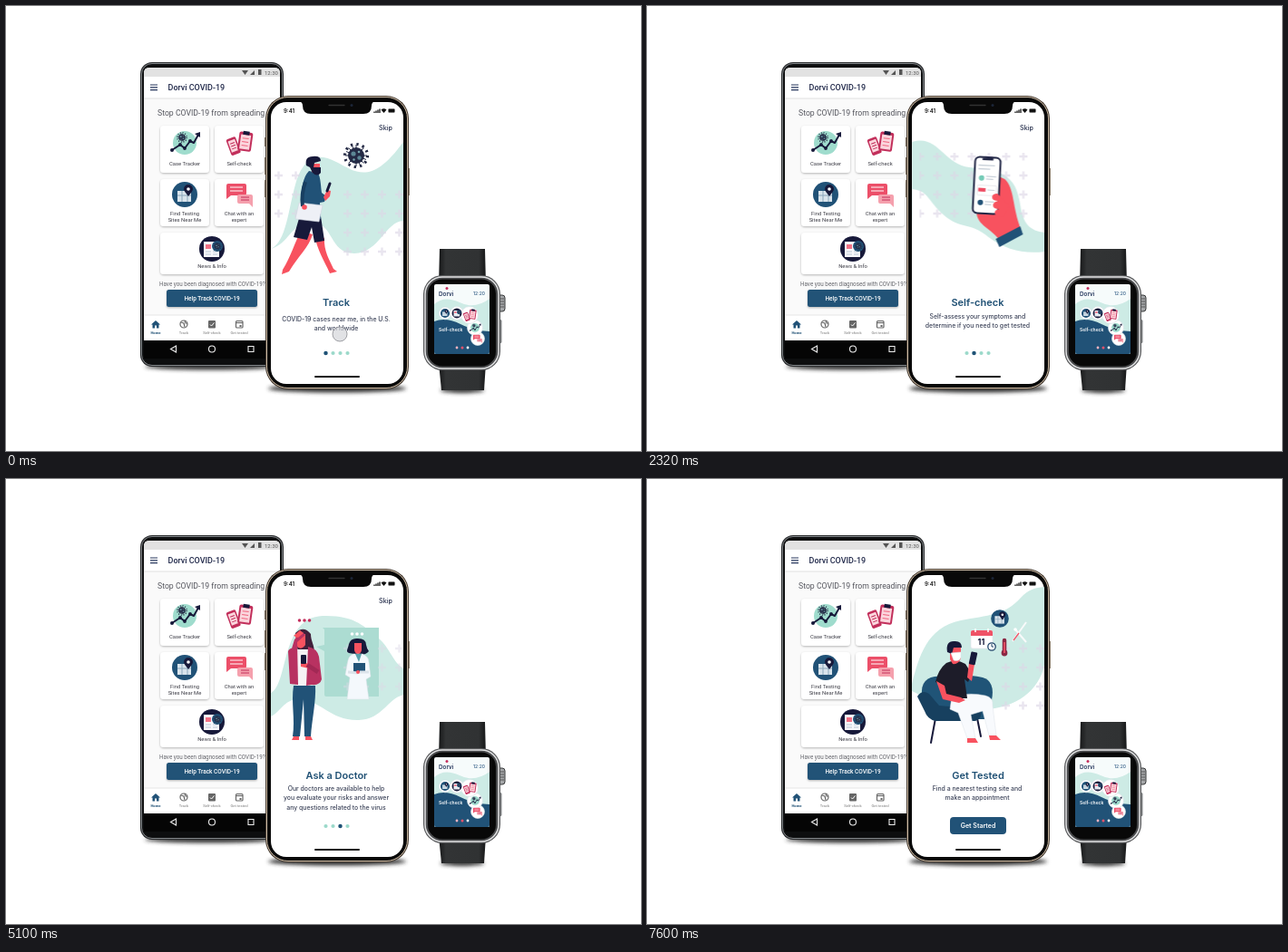
An HTML page for the animation above (8 s loop, 700 by 491 pixels).

```html
<!DOCTYPE html>
<html lang="en">
<head>
<meta charset="utf-8">
<title>Health app on three devices</title>
<style>
html, body { margin: 0; width: 100%; height: 100%; overflow: hidden; background: #fff; }
svg { display: block; width: 100%; height: 100%; }
text { font-family: Roboto, sans-serif; }
.ios text { font-family: Inter, sans-serif; }
.mid { text-anchor: middle; }
.title { font-size: 11px; font-weight: 600; fill: #1f5074; text-anchor: middle; }
.sub { font-size: 6.9px; font-weight: 500; fill: #3b4258; text-anchor: middle; }
.card { fill: #fff; filter: url(#cardShadow); }
.label { font-size: 5.9px; fill: #3b3b44; text-anchor: middle; }
.tab { font-size: 4.2px; fill: #777; text-anchor: middle; }
.skin { fill: #f8525f; }
.navy { fill: #17193a; }
.blue { fill: #215277; }
.wave { fill: #cdebe5; }
.shadow { fill: #333; filter: url(#blur); }
.line { fill: none; stroke: #17193a; stroke-linecap: round; stroke-linejoin: round; }

#strip, #trend, #cursor, #tapHand, .outer, .inner, #pager, .pip { animation: 8s linear infinite; }
#strip { animation-name: strip; }
@keyframes strip {
  0%, 22.75% { transform: none; animation-timing-function: cubic-bezier(.4,0,.2,1); }
  29.5%, 53.75% { transform: translateX(-146px); animation-timing-function: cubic-bezier(.4,0,.2,1); }
  60.5%, 88.25% { transform: translateX(-292px); animation-timing-function: cubic-bezier(.4,0,.2,1); }
  95%, 100% { transform: translateX(-438px); }
}
#trend { stroke-dasharray: 1 1; animation-name: trend; }
@keyframes trend { 0%, 1.25% { stroke-dashoffset: 1; } 8%, 100% { stroke-dashoffset: 0; } }
#endDot { animation: blink .4s .66s ease-in-out 6 alternate; }
@keyframes blink { to { opacity: .25; } }
#cursor { animation-name: cursor; }
@keyframes cursor {
  0%, 12% { transform: translate(368px,362px); opacity: 1; animation-timing-function: ease-in-out; }
  15.5% { transform: translate(354px,376px); opacity: 1; animation-timing-function: ease-in-out; }
  21%, 22.75% { transform: translate(401px,373px); opacity: 1; animation-timing-function: ease-in-out; }
  27% { transform: translate(330px,371px); opacity: .8; }
  29%, 42.5% { transform: translate(322px,371px); opacity: 0; animation-timing-function: step-end; }
  44% { transform: translate(428px,385px); opacity: 1; animation-timing-function: ease-in-out; }
  51.5%, 53.75% { transform: translate(401px,376px); opacity: 1; animation-timing-function: ease-in-out; }
  58% { transform: translate(330px,373px); opacity: .8; }
  60%, 79% { transform: translate(322px,373px); opacity: 0; animation-timing-function: step-end; }
  80.5% { transform: translate(418px,393px); opacity: 1; animation-timing-function: ease-in-out; }
  85.5%, 88.25% { transform: translate(393px,378px); opacity: 1; animation-timing-function: ease-in-out; }
  92% { transform: translate(330px,376px); opacity: .8; }
  94%, 100% { transform: translate(322px,376px); opacity: 0; }
}
#tapHand { animation-name: reach; }
@keyframes reach {
  0%, 31.5% { transform: translate(-55px,55px); opacity: 0; animation-timing-function: ease-out; }
  33% { opacity: 1; }
  42%, 100% { transform: none; opacity: 1; }
}
.outer { animation-name: hopOuter; }
@keyframes hopOuter { 0%, 61% { transform: none; } 63.75% { transform: translateY(-3px); } 66.5%, 69% { transform: none; } 71.5% { transform: translateY(-3px); } 74%, 100% { transform: none; } }
.inner { animation-name: hopInner; }
@keyframes hopInner { 0%, 64% { transform: none; } 67% { transform: translateY(-3px); } 70%, 72.5% { transform: none; } 74.3% { transform: translateY(-3px); } 76%, 100% { transform: none; } }
#pager { animation-name: pager; }
@keyframes pager { 0%, 89% { opacity: 1; } 91.5%, 100% { opacity: 0; } }
.pip { fill: #215277; animation-name: pip; animation-timing-function: step-end; }
@keyframes pip { 0% { transform: none; } 26% { transform: translateX(8px); } 57% { transform: translateX(16px); } 91% { transform: translateX(24px); } }
</style>
</head>
<body>
<svg viewBox="0 0 700 491" xmlns="http://www.w3.org/2000/svg">
<defs>
  <filter id="cardShadow" x="-20%" y="-20%" width="140%" height="140%"><feDropShadow dx="0" dy="1" stdDeviation="1.3" flood-opacity=".28"/></filter>
  <filter id="blur" x="-20%" y="-200%" width="140%" height="500%"><feGaussianBlur stdDeviation="2"/></filter>
  <linearGradient id="strap"><stop offset="0" stop-color="#161718"/><stop offset=".15" stop-color="#323435"/><stop offset=".85" stop-color="#303233"/><stop offset="1" stop-color="#161718"/></linearGradient>
  <pattern id="plus" width="19" height="21" patternUnits="userSpaceOnUse" x="291" y="176"><path d="M5 11h9M9.500 6.500v9" stroke="#ddd7e6" stroke-width="2.400"/></pattern>
  <clipPath id="screen"><rect x="292" y="106" width="146" height="311" rx="17"/></clipPath>
  <clipPath id="watchScreen"><rect x="472" y="307" width="61" height="77" rx="2"/></clipPath>
  <mask id="reveal" maskUnits="userSpaceOnUse" x="340" y="150" width="100" height="80"><path id="trend" pathLength="1" d="M345 222L367 209L382 193L397 199L430 159" fill="none" stroke="#fff" stroke-width="14"/></mask>
  <g id="virus">
    <circle r="12.500" fill="none" stroke="#242a45" stroke-width="3.200" stroke-dasharray="2.300 4.245"/>
    <path d="M-12 0H12M0-12V12M-8.500-8.500l17 17M-8.500 8.500l17-17M-11-4.500L11 4.500M-4.500-11L4.500 11" stroke="#242a45" stroke-width="1"/>
    <circle r="9" fill="#242a45"/><circle cx="-3" cy="-2" r="2.600" fill="#5c8795"/><circle cx="3.500" cy="2.500" r="2.200" fill="#5c8795"/><circle cx="3" cy="-4" r="1.300" fill="#78a8ae"/><circle cx="-2.500" cy="4.500" r="1.200" fill="#78a8ae"/>
  </g>
  <g id="site">
    <circle r="14" class="blue"/><path d="M-8-4h15v12h-15z" fill="#d9e4ec"/><path d="M-8 1h15M-3-4v12M3-4v12" stroke="#8aa6ba"/>
    <path d="M4 2C1-2-1-4-1-6a5 5 0 0 1 10 0c0 2-2 4-5 8z" class="navy"/><circle cx="4" cy="-6" r="1.800" fill="#fff"/>
  </g>
  <g id="tracker">
    <circle r="13" fill="#9fdccd"/><use href="#virus" transform="translate(-3 -6) scale(.42)"/>
    <path d="M-14 8l9-6l5 4l6-8l4 2l5-9" class="line" stroke-width="2"/><path d="M11-10l6-2l0 6z" class="navy"/>
    <g class="navy"><circle cx="-14" cy="8" r="2"/><circle cx="-5" cy="2" r="1.900"/><circle cx="0" cy="6" r="1.900"/><circle cx="6" cy="-2" r="1.900"/></g>
  </g>
  <g id="check">
    <g transform="rotate(-20 -6 3)"><rect x="-12" y="-6" width="11" height="19" rx="2" fill="#c22f5b"/><rect x="-10.500" y="-3.500" width="8" height="13" fill="#fbd6dd"/><path d="M-9 0h5M-9 3h5M-9 6h5" stroke="#c22f5b"/></g>
    <g transform="rotate(8 6 0)"><rect x="-1" y="-12" width="15" height="21" rx="2" fill="#c22f5b"/><rect x="1" y="-9" width="11" height="16" fill="#fbd6dd"/><path d="M3-5h7M3-1h7M3 3h7" stroke="#ef637d"/><path d="M3-13h7v4h-7z" class="navy"/></g>
  </g>
  <g id="chat">
    <path d="M-13-12h20q2 0 2 2v9q0 2-2 2h-15l-5 4v-15q0-2 2-2z" fill="#ec4f69"/><path d="M-9-8h14M-9-4h14" stroke="#fff" stroke-width="1.200"/>
    <path d="M1 0h13q2 0 2 2v12l-4-4h-11q-2 0-2-2v-6q0-2 2-2z" fill="#f5a0ad"/><path d="M3 3h9M3 6h9" stroke="#c22f5b"/>
  </g>
  <g id="news">
    <circle r="14" class="navy"/><path d="M-9-8h17v17h-17z" fill="#f6f7fb"/><path d="M-7-5h6v5h-6z" fill="#f17286"/><path d="M-7 3h6M-7 6h6M1 3h5M1 6h5" stroke="#b7c6d3" stroke-width="1.200"/><circle cx="6" cy="-3" r="6" class="blue"/><use href="#virus" transform="translate(6 -3) scale(.33)"/>
  </g>
  <g id="talk"><circle class="outer" cx="-5.500" r="1.800"/><circle class="inner" r="1.800"/><circle class="outer" cx="5.500" r="1.800"/></g>
</defs>

<!-- Android phone -->
<g>
  <ellipse class="shadow" cx="225" cy="398" rx="72" ry="3.500"/>
  <rect x="148" y="62" width="158" height="336" rx="13" fill="#2a2c2e"/>
  <rect x="149.500" y="63.500" width="155" height="333" rx="11.500" fill="#0d0e0f" stroke="#a0a4a8" stroke-width=".8"/>
  <path d="M152 74q0-6 6-6h138q6 0 6 6v295h-150z" fill="#fafafa"/>
  <path d="M152 78v-4q0-6 6-6h138q6 0 6 6v4z" fill="#e2e2e2"/>
  <path d="M260 71h7l-3.500 5zM269 76l5-5v5z" fill="#555"/><rect x="278" y="70" width="3.500" height="6" fill="#555"/>
  <text x="285" y="75.500" font-size="6" fill="#555">12:30</text>
  <path d="M152 78h150v23.500h-150z" fill="#fff"/><path d="M152 102h150" stroke="#e2e2e2"/>
  <path d="M159 87h8M159 89.800h8M159 92.600h8" stroke="#26365c" stroke-width="1.200"/>
  <text x="178.500" y="93" font-size="9" font-weight="500" fill="#222a4b">Dorvi COVID-19</text>
  <text x="167" y="121" font-size="8.700" fill="#55565e">Stop COVID-19 from spreading</text>
  <rect class="card" x="170" y="132" width="54" height="52" rx="4"/><use href="#tracker" x="197" y="151"/><text class="label" x="197" y="176">Case Tracker</text>
  <rect class="card" x="230" y="132" width="54" height="52" rx="4"/><use href="#check" x="257" y="151"/><text class="label" x="257" y="176">Self-check</text>
  <rect class="card" x="170" y="191" width="54" height="52" rx="4"/><use href="#site" x="197" y="208"/><text class="label" x="197" y="231">Find Testing</text><text class="label" x="197" y="238">Sites Near Me</text>
  <rect class="card" x="230" y="191" width="54" height="52" rx="4"/><use href="#chat" x="256" y="208"/><text class="label" x="257" y="231">Chat with an</text><text class="label" x="257" y="238">expert</text>
  <rect class="card" x="170" y="250" width="114" height="46" rx="4"/><use href="#news" x="227" y="268"/><text class="label" x="227" y="289">News &amp; Info</text>
  <text x="169" y="309" font-size="6.300" fill="#66676d">Have you been diagnosed with COVID-19?</text>
  <rect x="177" y="313" width="100" height="19" rx="2.500" class="blue" filter="url(#cardShadow)"/>
  <text class="mid" x="227" y="325" font-size="6.500" font-weight="500" fill="#fff">Help Track COVID-19</text>
  <path d="M152 341h150v28h-150z" fill="#fff"/><path d="M152 341h150" stroke="#e5e5e5"/>
  <path d="M160 351.500l5-4.500l5 4.500h-1.500v4h-2.500v-3h-2v3h-2.500v-4z" class="blue"/>
  <g fill="none" stroke="#666" stroke-width="1.200"><circle cx="196" cy="351" r="4"/><path d="M193 349l3 1l1 4M197 347l1 3h2"/><rect x="253.500" y="347.500" width="7.500" height="7.500" rx="1"/><path d="M253 349.500h8"/></g>
  <rect x="223" y="347" width="8" height="8.500" rx="1" fill="#666"/><path d="M225 351.500l1.500 1.500l3-3.500" fill="none" stroke="#fff"/><path d="M257.500 352h2v2h-2z" fill="#666"/>
  <text class="tab" x="165" y="361.500" style="fill:#1f5074;font-weight:700">Home</text><text class="tab" x="196" y="361.500">Track</text><text class="tab" x="227" y="361.500">Self-check</text><text class="tab" x="257" y="361.500">Get tested</text>
  <path d="M152 369h150v20h-150z" fill="#050505"/>
  <g fill="none" stroke="#eee" stroke-width="1.100"><path d="M187.500 375v7l-6-3.500z"/><circle cx="227" cy="378.500" r="3.500"/><path d="M267 375.500h6v6h-6z"/></g>
</g>

<!-- Main phone -->
<g class="ios">
  <ellipse class="shadow" cx="365" cy="422" rx="76" ry="4.500"/>
  <path d="M285.700 145v10M285.700 167v19M285.700 192v19M444.300 179v30" stroke="#73634f"/>
  <rect x="286" y="99" width="158" height="324" rx="25" fill="#4a3f35"/>
  <rect x="287.500" y="100.500" width="155" height="321" rx="23.500" fill="#090909" stroke="#cdbca6"/>
  <rect x="292" y="106" width="146" height="311" rx="17" fill="#fff"/>
  <g clip-path="url(#screen)">
    <g id="strip">
      <g>
        <path class="wave" d="M292 268C309 260 311 225 319 197S341 160 364 172S403 198 438 150V237C418 238 412 272 384 273C354 273 363 236 333 239C314 241 312 262 292 268z"/>
        <path d="M292 176h55v65h-55zM367 197h71v84h-71z" fill="url(#plus)" opacity=".65"/>
        <use href="#virus" x="386" y="165"/>
        <path class="skin" d="M325 248L338 252C334 266 322 276 312 293L304 296L305 291C314 276 318 262 325 248zM340 252L351 256C350 270 357 281 361 290L365 293L357 295C351 281 343 270 340 252z"/>
        <path class="navy" d="M324 231L347 232L351 259L340 261L337 244L332 258L317 255z"/>
        <path class="blue" d="M334 182L344 184C347 190 347 199 348 206L353 210L351 216L346 217L347 235L324 234C326 219 324 211 327 197Q329 187 334 182z"/>
        <path class="skin" d="M337 174h9v8q-1 4-5 3l-4-2zM350 211l4-8l4 1l-1 6l-5 5z"/>
        <path class="navy" d="M331 176Q329 166 338 166Q347 165 347 171L340 173L339 178H347V184Q343 189 338 184L335 178z"/>
        <path class="line" d="M357 196l-3 8" stroke-width="3"/>
        <path d="M323 217L349 220L345 238L319 235z" fill="#eef0f6" stroke="#cfd5df" stroke-width=".6"/>
        <path d="M330 194Q325 208 327 221" fill="none" stroke="#183f61" stroke-width="4"/><circle cx="329" cy="222" r="2.800" class="skin"/>
        <g mask="url(#reveal)">
          <path class="line" d="M352 218L361 213M372 204L377 198M387 195L392 197M402 193L407 187M413 180L424 166" stroke-width="3.700"/>
          <g class="navy"><circle cx="367" cy="210" r="3"/><circle cx="382" cy="193" r="3"/><circle cx="397" cy="199" r="3"/></g>
          <circle cx="424" cy="166" r="3.700" fill="#b5cfcb"/><circle id="endDot" cx="424" cy="166" r="3.700" class="navy"/>
        </g>
        <text class="title" x="364" y="331">Track</text><text class="sub" x="364" y="348">COVID-19 cases near me, in the U.S.</text><text class="sub" x="364" y="358">and worldwide</text>
      </g>

      <g transform="translate(146 0)">
        <path class="wave" d="M292 150C320 141 327 175 355 178C390 182 406 185 411 219C414 241 422 248 438 250V271C415 274 395 269 376 255C356 238 345 247 326 230C309 215 310 204 292 202z"/>
        <path d="M300 162h126v82h-126z" fill="url(#plus)" opacity=".65"/>
        <path class="skin" d="M383 186L394 191C405 201 402 222 412 247L389 260C381 246 366 244 363 230L370 218z"/>
        <path class="blue" d="M384 257L411 243L414 252L388 266z"/>
        <g transform="rotate(3 374 198)">
          <rect x="360" y="167" width="28" height="62" rx="5" fill="#fff" stroke="#222746" stroke-width="2"/><path d="M368 169h12" stroke="#222746" stroke-width="2.500"/>
          <path d="M364 176h18M364 180h13M373 188h11M373 191h8M373 216h10M373 219h7" stroke="#cad2da" stroke-width="1.300"/>
          <circle cx="368" cy="190" r="3" fill="#75cbb7"/><rect x="364" y="198" width="21" height="11" rx="1" fill="#fff" stroke="#e2e2e8" stroke-width=".7"/><rect x="365" y="201" width="8" height="4" fill="#ed4c62"/><path d="M375 203h8" stroke="#cad2da"/><circle cx="368" cy="217" r="3" class="blue"/>
        </g>
        <path class="skin" d="M386 207q-6 0-6 4t7 4q-6 1-6 5t7 4q-6 1-5 5t9 4l7-12z"/>
        <g id="tapHand">
          <path class="skin" d="M362 207Q365 203 369 207L362 227L369 231Q371 241 363 248C354 255 352 264 347 281L320 272C327 260 324 247 329 237Q335 230 349 226z"/>
          <path d="M360 227l-10 9M365 234l-9 7" stroke="#d53d50" stroke-width=".8"/>
          <path class="blue" d="M318 271L352 281L349 291L314 281z"/>
        </g>
        <text class="title" x="364" y="331">Self-check</text><text class="sub" x="364" y="344.500">Self-assess your symptoms and</text><text class="sub" x="364" y="354.500">determine if you need to get tested</text>
      </g>

      <g transform="translate(292 0)">
        <path class="wave" d="M292 236C312 226 302 153 349 151C385 150 395 163 411 176C423 186 427 203 438 209V238C420 243 415 265 389 266C357 267 349 244 321 243C306 244 303 257 292 262z"/>
        <path d="M349 164h62v76h-58q-2 0-2-2v-48l-9-5l9-2v-17z" fill="#acdcd2"/>
        <path d="M367 176h69v69h-69z" fill="url(#plus)" opacity=".45"/>
        <use href="#talk" x="329" y="156" fill="#c42f5d"/>
        <use href="#talk" x="387" y="171" fill="#fff"/>
        <path fill="#41203b" d="M319 170Q328 161 336 171C336 181 342 184 339 198L323 200z"/>
        <path class="skin" d="M319 171h11v12q-5 7-10 1z"/>
        <path d="M320 188h14v41h-14z" fill="#f6f1f4"/>
        <path class="blue" d="M317 228H341C342 245 337 267 336 284H329L328 243L324 284H316C319 264 314 247 317 228z"/>
        <path d="M320 187L315 187L318 177L327 169L330 172L321 180L322 227L313 226L311 190Q313 185 320 187zM333 185Q343 187 345 196L348 221Q346 228 337 227L331 228z" fill="#b83261"/>
        <path class="skin" d="M317 173l7-6l4 3l-6 5zM325 202l10 2l-1 5l-9-2z"/><rect class="navy" x="325" y="194" width="6" height="10" rx="1"/>
        <path d="M344 213l-12-8" stroke="#a22955" stroke-width="5"/>
        <path class="skin" d="M317 284h6v4h-8zM330 284h6l2 4h-8z"/>
        <path class="navy" d="M378 192C374 190 377 188 378 182Q380 175 388 176Q397 176 397 183Q398 188 400 190Q397 194 390 194z"/>
        <path class="skin" d="M384 181h8v8q-1 4-4 4t-4-4z"/>
        <path d="M383 193L393 193Q400 196 400 202L402 218L397 221L400 243H376L379 219L374 216L377 200Q378 195 383 193z" fill="#f4f8fc" stroke="#d8e0e7" stroke-width=".5"/>
        <path d="M385 193h7l-3 9z" fill="#5ba1ac"/><rect x="383" y="203" width="13" height="10" class="blue"/>
        <path d="M377 213l11 1M400 213l-10 0" stroke="#dbe3ea" stroke-width="3"/><circle cx="388" cy="213" r="2" class="skin"/>
        <text class="title" x="364.500" y="331">Ask a Doctor</text><text class="sub" x="364" y="343.500">Our doctors are available to help</text><text class="sub" x="364" y="354">you evaluate your risks and answer</text><text class="sub" x="364" y="364.500">any questions related to the virus</text>
      </g>

      <g transform="translate(438 0)">
        <path class="wave" d="M292 226C300 196 308 164 346 156C376 150 394 151 412 131C420 122 428 120 438 119V205C432 235 405 252 375 254C340 258 315 245 292 234z"/>
        <path d="M386 176h52v85h-52z" fill="url(#plus)" opacity=".65"/>
        <use href="#site" transform="translate(389 154) scale(.7)"/>
        <path d="M403 179l15-21M406 166l12 14" stroke="#f8fafa" stroke-width="2"/><path d="M404 178l6-8" stroke="#ef5367" stroke-width="1.300"/><circle cx="406" cy="166" r="1.800" fill="#fff"/>
        <rect x="357" y="167" width="24" height="20" rx="2" fill="#fff" stroke="#e2e3ea" stroke-width=".7"/><path d="M357 173v-4q0-2 2-2h20q2 0 2 2v4z" fill="#ef5367"/><path d="M362 165v4M376 165v4" stroke="#fff" stroke-width="1.500"/>
        <text class="mid" x="368.500" y="183" font-size="9" font-weight="700" fill="#17193a">11</text>
        <circle cx="380" cy="185" r="4.200" fill="#fff" stroke="#21456a" stroke-width="1.300"/><path d="M380 182v3h2" fill="none" stroke="#21456a"/>
        <path d="M394 178v13" stroke="#8a2744" stroke-width="4.500" stroke-linecap="round"/><circle cx="394" cy="192" r="3.400" fill="#8a2744"/><path d="M394 180v12" stroke="#ef5367" stroke-width="1.700"/>
        <path d="M318 264l-5 27M364 264l4 20" class="line" stroke-width="2"/>
        <path d="M304 244Q299 221 317 218Q348 214 370 219Q384 223 380 244L372 265H316z" fill="#205477"/>
        <path d="M298 240Q303 232 311 237L322 250L368 254Q370 265 362 267H318Q309 265 306 256z" fill="#17405f"/>
        <path d="M336 240Q356 235 373 239Q382 241 381 250L385 283H377L370 256L357 260L362 286H353L343 258L334 254z" fill="#f8fafd" stroke="#dce3e9" stroke-width=".5"/>
        <path d="M353 286h9l3 5h-12zM377 283h8l5 5h-12z" class="skin"/>
        <path d="M330 203Q341 198 351 204L358 215L354 224L350 221L353 242H328L327 229L318 224Q321 210 330 203z" fill="#1d1c29"/>
        <path d="M319 223l9 5l2 9l16 4l5 3l-7 3l-18-4zM353 219l2-16l6 1l-3 19z" class="skin"/>
        <rect x="356" y="191" width="7" height="14" rx="1" class="navy" transform="rotate(12 360 198)"/>
        <path class="skin" d="M334 185h12v13q-3 7-9 6l-3-5z"/>
        <path class="navy" d="M331 191Q329 179 338 179Q347 178 347 186H338L336 193z"/>
        <path d="M335 192l11-1v6q-2 5-8 3z" fill="#fff" stroke="#d8e3e8" stroke-width=".5"/>
        <text class="title" x="365" y="331">Get Tested</text><text class="sub" x="364" y="344">Find a nearest testing site and</text><text class="sub" x="364" y="354">make an appointment</text>
        <rect x="334" y="373" width="62" height="19" rx="4" class="blue"/><text class="mid" x="365" y="385" font-size="7" font-weight="600" fill="#fff">Get Started</text>
      </g>
    </g>
    <g id="pager">
      <g fill="#9bd9ca"><circle cx="352.500" cy="383" r="2.100"/><circle cx="360.500" cy="383" r="2.100"/><circle cx="368.500" cy="383" r="2.100"/><circle cx="376.500" cy="383" r="2.100"/></g>
      <circle class="pip" cx="352.500" cy="383" r="2.200"/>
      <text x="411" y="136.500" font-size="7.200" font-weight="500" fill="#222b49">Skip</text>
    </g>
    <circle id="cursor" r="8" fill="#d6d7db" fill-opacity=".72" stroke="#96979c" stroke-width=".9"/>
  </g>
  <path d="M323 105q4 1 4 5q0 9 9 9h58q9 0 9-9q0-4 4-5z" fill="#090909"/>
  <path d="M356 109.500h17" stroke="#333" stroke-width="1.300" stroke-linecap="round"/><circle cx="381" cy="109.500" r="1.500" fill="#1c2638"/>
  <text x="306" y="118" font-size="6" font-weight="600" fill="#111">9:41</text>
  <path d="M406 118v-1.500M408 118v-2.500M410 118v-3.500M412 118v-4.500" stroke="#111" stroke-width="1.300"/><path d="M413.500 114.500q3-2.500 6 0l-3 3.500z" fill="#111"/>
  <rect x="421.500" y="113.500" width="7" height="4" rx="1" fill="#111" stroke="#777" stroke-width=".6"/>
  <path d="M341 409h48" stroke="#111" stroke-width="2" stroke-linecap="round"/>
</g>

<!-- Watch -->
<g class="ios">
  <ellipse class="shadow" cx="503" cy="424" rx="24" ry="3"/>
  <path d="M478 268h50l1 40h-52zM477 394h52l-2 30h-47z" fill="url(#strap)"/>
  <rect x="542" y="319" width="8" height="18" rx="3" fill="#a5a7a9" stroke="#353637"/><path d="M544 323h5M544 326h5M544 329h5M544 332h5" stroke="#333" stroke-width=".7"/>
  <rect x="543" y="346" width="3.500" height="26" rx="1.500" fill="#838587"/>
  <rect x="460" y="297" width="85" height="105" rx="21" fill="#58595b"/>
  <rect x="462" y="299" width="81" height="101" rx="19" fill="#4a4b4d" stroke="#e3e4e5" stroke-width="1.500"/>
  <rect x="465" y="301.500" width="75" height="96" rx="16" fill="#080808"/>
  <g clip-path="url(#watchScreen)">
    <path d="M472 307h61v77h-61z" fill="#f6fbfb"/><path d="M472 329Q483 319 500 327T533 323V384H472z" class="wave"/><path d="M472 348Q485 343 501 351T533 359V384H472z" class="blue"/>
    <circle cx="486" cy="311.500" r="1.500" fill="#c42f5d"/>
    <text x="477" y="320" font-size="6.300" font-weight="600" fill="#26375d">Dorvi</text><text x="515" y="319" font-size="5" font-weight="500" fill="#315c85">12:20</text>
    <g fill="#fff" stroke="#d6e3e7" stroke-width=".7"><circle cx="484" cy="339" r="6.800"/><circle cx="497" cy="339" r="7.500"/><circle cx="520" cy="367" r="7.500"/><circle cx="517" cy="355" r="8.500"/><circle cx="511" cy="341" r="9.500"/></g>
    <use href="#site" transform="translate(484 339) scale(.36)"/><use href="#news" transform="translate(497 339) scale(.39)"/><use href="#check" transform="translate(511 341) scale(.5)"/><use href="#tracker" transform="translate(517 355) scale(.38)"/><use href="#chat" transform="translate(519.500 367) scale(.35)"/>
    <text x="477" y="359" font-size="5" font-weight="600" fill="#fff">Self-check</text>
    <circle cx="497" cy="377" r="1.400" fill="#f3b3c1"/><circle cx="503" cy="377" r="1.500" fill="#ee536c"/><circle cx="509" cy="377" r="1.400" fill="#fff"/>
  </g>
</g>
<script>
// Repeats the end dot's blink once per loop.
const dot = document.getElementById('endDot');
dot.style.animation = 'none';
function blink() {
  const t = performance.now() % 8000;
  dot.style.opacity = t < 660 || t > 2400 ? 1 : .63 + .37 * Math.cos((t - 660) * Math.PI / 400);
  requestAnimationFrame(blink);
}
blink();
</script>
</svg>
</body>
</html>
```
